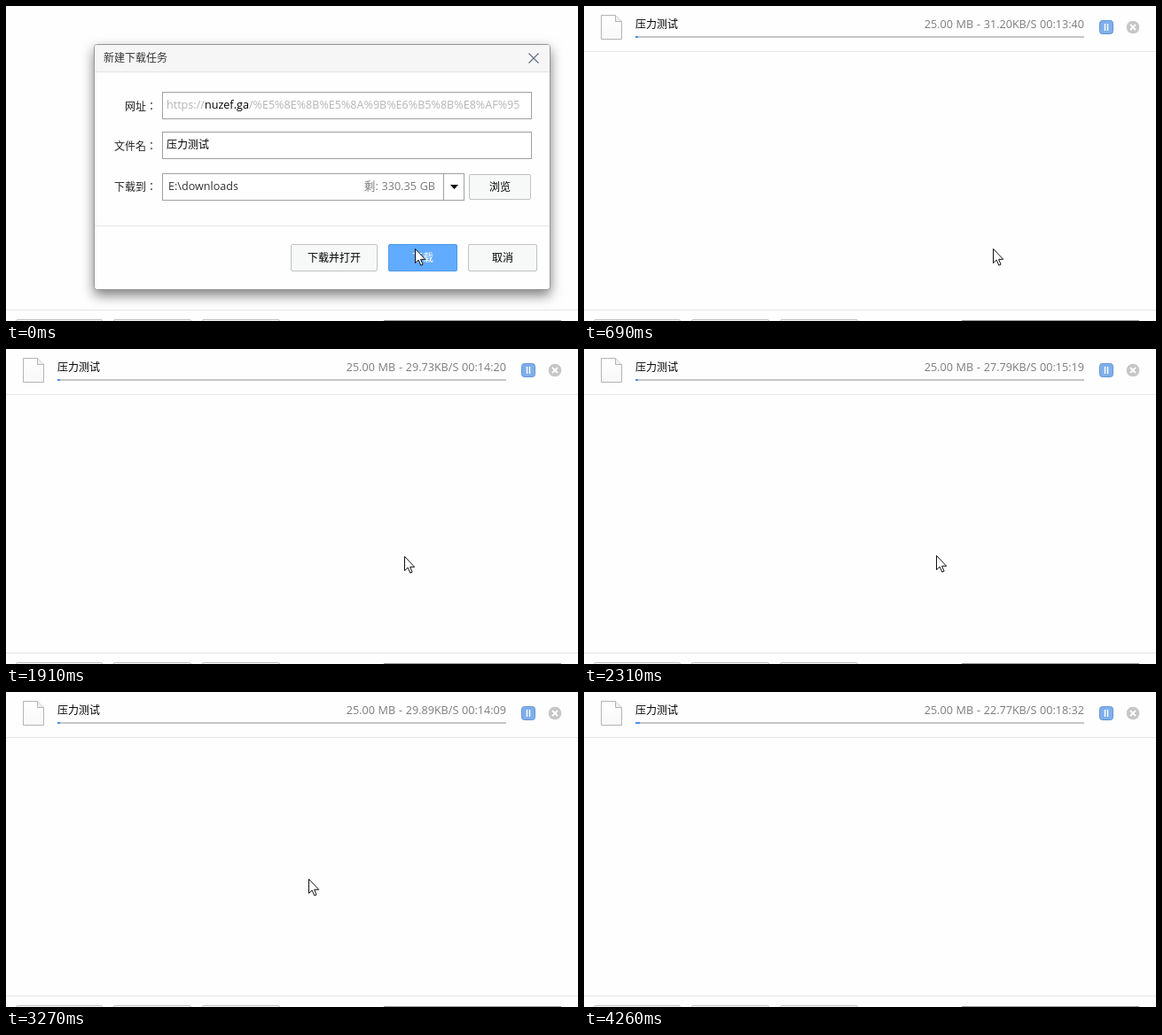
These frames come from a looping animation (645 by 356 pixels, 4.4 s). An HTML page:

```html
<!DOCTYPE html>
<html lang="zh-CN">
<head>
<meta charset="utf-8">
<title>新建下载任务</title>
<style>
  html, body { margin: 0; width: 100%; height: 100%; overflow: hidden; background: #fefefe; }
  svg { display: block; width: 645px; height: 356px; }
  text { font: 12px "Open Sans", "Noto Sans CJK SC", "Noto Sans CJK", sans-serif; white-space: pre; }
  .latin { font-size: 12.6px; word-spacing: .5px; }
  .hint { font-size: 16px; font-weight: 300; fill: #aaa; }
  .mid { text-anchor: middle; }
  .end { text-anchor: end; }
  .gray { fill: #7c7c7c; }
  .pale { fill: #b4b4b4; }
  .domain { fill: #000; font-weight: 500; }
  .field { fill: #fff; stroke: #a0a0a0; }
  .button { fill: #f7f8f8; stroke: #c2c2c2; }
  .rule { stroke: #e6e6e6; }
  #dialog { filter: drop-shadow(0 6px 7px rgba(0, 0, 0, .5)); }
</style>
</head>
<body>
<svg viewBox="0 0 645 356">
  <defs>
    <linearGradient id="paper" x2="0" y2="1">
      <stop stop-color="#fff"/><stop offset="1" stop-color="#f8f8f8"/>
    </linearGradient>
  </defs>
  <rect width="645" height="356" fill="#fefefe"/>

  <g id="empty">
    <circle cx="323" cy="151" r="58.5" fill="#efefef" stroke="#dedede"/>
    <path d="M313 125h20v30h14l-24 28l-24 -28h14z" fill="#fff"/>
    <text class="hint mid" x="322.5" y="244">您下载的文件将会出现在这里</text>
  </g>

  <g id="task">
    <path d="M19.5 10.5h16l7 7v20h-23z" fill="url(#paper)" stroke="#b4b4b4"/>
    <path d="M35.5 10.5v7h7" fill="#f0f0f0" stroke="#b4b4b4"/>
    <text x="58" y="25">压力测试</text>
    <text id="status" class="latin gray end" x="564" y="25"></text>
    <rect x="58" y="34" width="506" height="2" fill="#c6c6c6"/>
    <rect id="bar" x="58" y="34" height="2" fill="#4a92e2"/>
    <rect x="581.5" y="16.5" width="15" height="15" rx="3" fill="#7fafea" stroke="#6596d6"/>
    <path d="M587.5 20v8M590.5 20v8" stroke="#fff" stroke-width="1.4"/>
    <circle cx="619" cy="24" r="7.3" fill="#c6c6c6"/>
    <path d="M616 21l6 6m0 -6l-6 6" stroke="#fff" stroke-width="1.8"/>
    <path class="rule" d="M0 51.5h645"/>
  </g>

  <path d="M0 343.5h645" stroke="#e4e4e4"/>
  <g class="button">
    <rect x="11.5" y="354.5" width="97" height="20" rx="1.5"/>
    <rect x="121.5" y="354.5" width="87" height="20" rx="1.5"/>
    <rect x="221.5" y="354.5" width="87" height="20" rx="1.5"/>
  </g>
  <path d="M426 355.5h200" stroke="#999"/>

  <g id="dialog">
    <rect x="99.5" y="43.5" width="514" height="277" rx="3" fill="#fefefe" stroke="#959595"/>
    <path d="M100 74v-28q0 -2 2 -2h509q2 0 2 2v28z" fill="#f6f6f6"/>
    <path class="rule" d="M100 74.5h513M100 248.5h513"/>
    <text x="110" y="62.5" fill="#333">新建下载任务</text>
    <path d="M589.5 53.5l11 11m0 -11l-11 11" stroke="#687088" stroke-width="1.2"/>

    <g class="end" fill="#222" lang="zh-Hant">
      <text x="170" y="117.5">网址：</text>
      <text x="170" y="163">文件名：</text>
      <text x="170" y="209">下载到：</text>
    </g>
    <rect class="field" x="176.5" y="97.5" width="416" height="30"/>
    <text class="latin pale" x="181" y="116">https://<tspan class="domain">nuzef.ga</tspan>/%E5%8E%8B%E5%8A%9B%E6%B5%8B%E8%AF%95</text>
    <rect class="field" x="176.5" y="142.5" width="416" height="30"/>
    <text x="181" y="161">压力测试</text>
    <rect class="field" x="176.5" y="189.5" width="340" height="30"/>
    <path d="M493.5 190v29" stroke="#a0a0a0"/>
    <path d="M501 202h9l-4.5 5z"/>
    <text class="latin" x="183" y="208" fill="#333">E:\downloads</text>
    <text class="latin gray end" x="484" y="208">剩: 330.35 GB</text>

    <g class="button">
      <rect x="522.5" y="190.5" width="69" height="28" rx="1.5"/>
      <rect x="321.5" y="269.5" width="97" height="30" rx="1.5"/>
      <rect x="521.5" y="269.5" width="77" height="30" rx="1.5"/>
    </g>
    <rect x="431.5" y="269.5" width="77" height="30" rx="1.5" fill="#62acff" stroke="#5099ea"/>
    <g class="mid">
      <text x="557" y="209">浏览</text>
      <text x="370" y="289">下载并打开</text>
      <text x="470" y="289" fill="#fff">下载</text>
      <text x="560" y="289">取消</text>
    </g>
  </g>

  <path id="cursor" d="M.5 .5v16l3.7 -3.4l2.6 6l2.3 -1l-2.5 -5.8h5.1z" fill="#fff" stroke="#111"/>
</svg>
<script>
const LOOP = 4400, STEP = 90, PHASE = 30;
const $ = id => document.getElementById(id);
const dialog = $('dialog'), empty = $('empty'), task = $('task');
const label = $('status'), bar = $('bar'), cursor = $('cursor');

// time, x, y
const path = [
  [840, 461, 274], [1200, 424, 231], [1380, 385, 240], [1830, 449, 234],
  [2100, 452, 254], [2460, 341, 211], [3540, 341, 211], [4080, 601, 295]
];

// time, KB/s, KB left
const transfer = [
  [840, 31.2, 25584], [1020, 29.73, 25568], [1920, 29.73, 25568],
  [2640, 25.85, 25514], [2910, 31.1, 25460], [3270, 29.89, 25377],
  [3360, 29.89, 25377], [4260, 22.77, 25320]
];

// The screen refreshes only once per step.
const snap = t => Math.floor((t - PHASE) / STEP) * STEP + PHASE;

function along(keys, t) {
  const next = keys.findIndex(key => key[0] > t);
  if (next === 0) return keys[0].slice(1);
  if (next < 0) return keys.at(-1).slice(1);
  const a = keys[next - 1], b = keys[next];
  const k = (t - a[0]) / (b[0] - a[0]);
  return a.slice(1).map((v, i) => v + (b[i + 1] - v) * k);
}

const show = (node, on) => node.setAttribute('visibility', on ? 'visible' : 'hidden');
const two = n => String(n).padStart(2, '0');
const clock = s => `00:${two(Math.floor(s / 60))}:${two(s % 60)}`;

function draw(t) {
  show(dialog, t < 70);
  dialog.setAttribute('opacity', t < 30 ? 1 : 0.4);
  show(empty, t < 690);
  show(task, t >= 690);

  const [speed, left] = along(transfer, snap(t));
  label.textContent = `25.00 MB - ${speed.toFixed(2)}KB/S ${clock(Math.round(left / speed))}`;
  bar.setAttribute('width', t < 3800 ? 3 : 5);

  const [x, y] = along(path, snap(t)).map(Math.round);
  cursor.setAttribute('transform', `translate(${x} ${y})`);
  show(cursor, t < 4220);
}

const start = performance.now();
function tick() {
  draw((performance.now() - start) % LOOP);
  requestAnimationFrame(tick);
}
tick();
</script>
</body>
</html>
```
